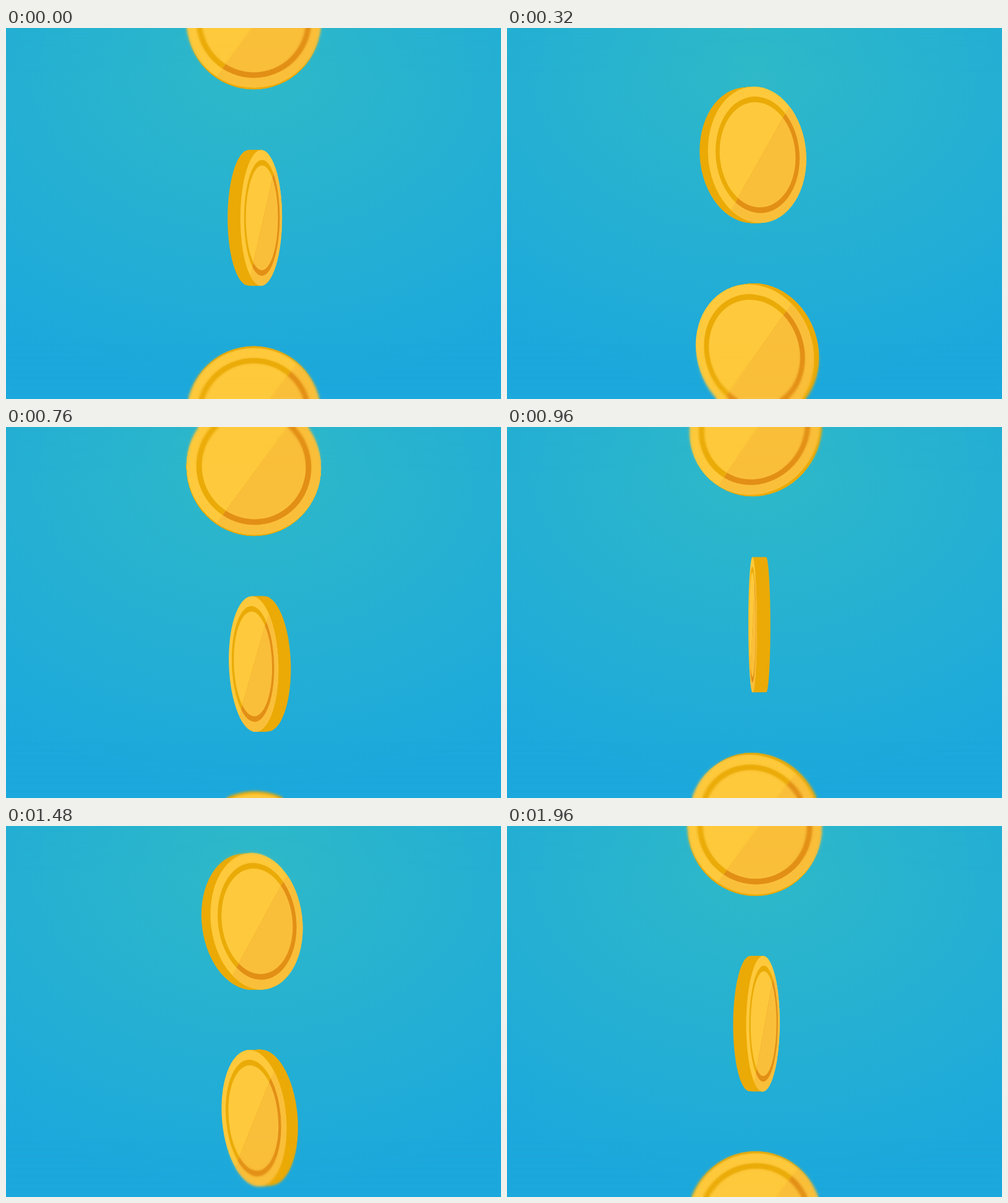
Recreate the animation shown at these times as an HTML page with a canvas. Size 800x600 px, loop 2 s.

```html
<!DOCTYPE html>
<html>
<head>
<meta charset="utf-8">
<title>Spinning coins</title>
<style>
  html, body { margin: 0; width: 100%; height: 100%; overflow: hidden; }
  body { background: radial-gradient(700px 530px at 401px 62px, #2fb9c8, #1ca8dc); }
  canvas { display: block; }
  /* soft focus towards the top and bottom of the stage */
  #focus {
    position: absolute; left: 0; top: 0; width: 800px; height: 600px;
    backdrop-filter: blur(2.2px);
    -webkit-mask-image: linear-gradient(#000, transparent 75px, transparent 510px, #000 590px);
    mask-image: linear-gradient(#000, transparent 75px, transparent 510px, #000 590px);
  }
</style>
</head>
<body>
<canvas id="stage" width="800" height="600"></canvas>
<div id="focus"></div>
<script>
const ctx = document.getElementById('stage').getContext('2d');
const LOOP = 2000, STEP = 40, GAP = 317.5, R = 109;
const RIM = '#ebaa06';
const LIGHT = { face: '#fec93c', ring: '#eaab08' };
const SHADE = { face: '#fabf3a', ring: '#e28f16' };

function disc(x, r, color) {
  ctx.fillStyle = color;
  ctx.beginPath();
  ctx.arc(x, 0, r, 0, Math.PI * 2);
  ctx.fill();
}

function paintFace(shift, colors) {
  disc(0, 1, colors.face);
  disc(shift, 0.855, colors.ring);
  disc(shift, 0.772, colors.face);
}

// angle runs from 0 to PI: face on, edge on, face on again
function coin(y, angle) {
  const sin = Math.sin(angle), cos = Math.cos(angle);
  const flat = Math.max(Math.abs(cos), 0.001), side = Math.sign(cos) || 1;
  const fromMid = y - 300;
  const lean = R * fromMid * 0.00098 * sin * side;
  const height = 109.5 - 0.6 * cos;
  const centre = 400.5 + 5.5 * Math.sin(2 * angle) + 6.5 * sin ** 3 - 0.8 * Math.sin(4 * angle);
  const depthX = 22 * sin ** 1.2 * side;
  const depthY = -0.0125 * fromMid * flat;

  // depth: 0 is the visible face, 1 the back
  const place = depth => {
    const s = 1 - 0.0093 * flat * depth;
    ctx.setTransform(R * flat * s, lean * s, 0, height * s,
      centre + depthX * (depth - 0.5), y + depthY * (depth - 0.5));
  };

  for (let i = 24; i > 0; i--) {
    place(i / 24);
    disc(0, 1, RIM);
  }

  place(0);
  const shift = -1.2 * sin * side / (R * Math.max(flat, 0.3));
  paintFace(shift, LIGHT);
  ctx.save();
  const edge = 0.065 - 0.05 * sin * side;
  ctx.beginPath();
  ctx.moveTo(edge + 1.48, -2);
  ctx.lineTo(4, -2);
  ctx.lineTo(4, 2);
  ctx.lineTo(edge - 1.48, 2);
  ctx.clip();
  paintFace(shift, SHADE);
  ctx.restore();
}

function draw(t) {
  ctx.setTransform(1, 0, 0, 1, 0, 0);
  ctx.clearRect(0, 0, 800, 600);
  for (let i = -2; i < 4; i++) {
    const y = 624.5 + GAP * (i - 2 * t / LOOP);
    if (y < -130 || y > 730) continue;
    const spin = t - (i % 2 ? 800 : 0) + LOOP;
    coin(y, spin % LOOP / LOOP * Math.PI);
  }
}

function tick() {
  draw(Math.floor(performance.now() % LOOP / STEP) * STEP);
  requestAnimationFrame(tick);
}
tick();
</script>
</body>
</html>
```
